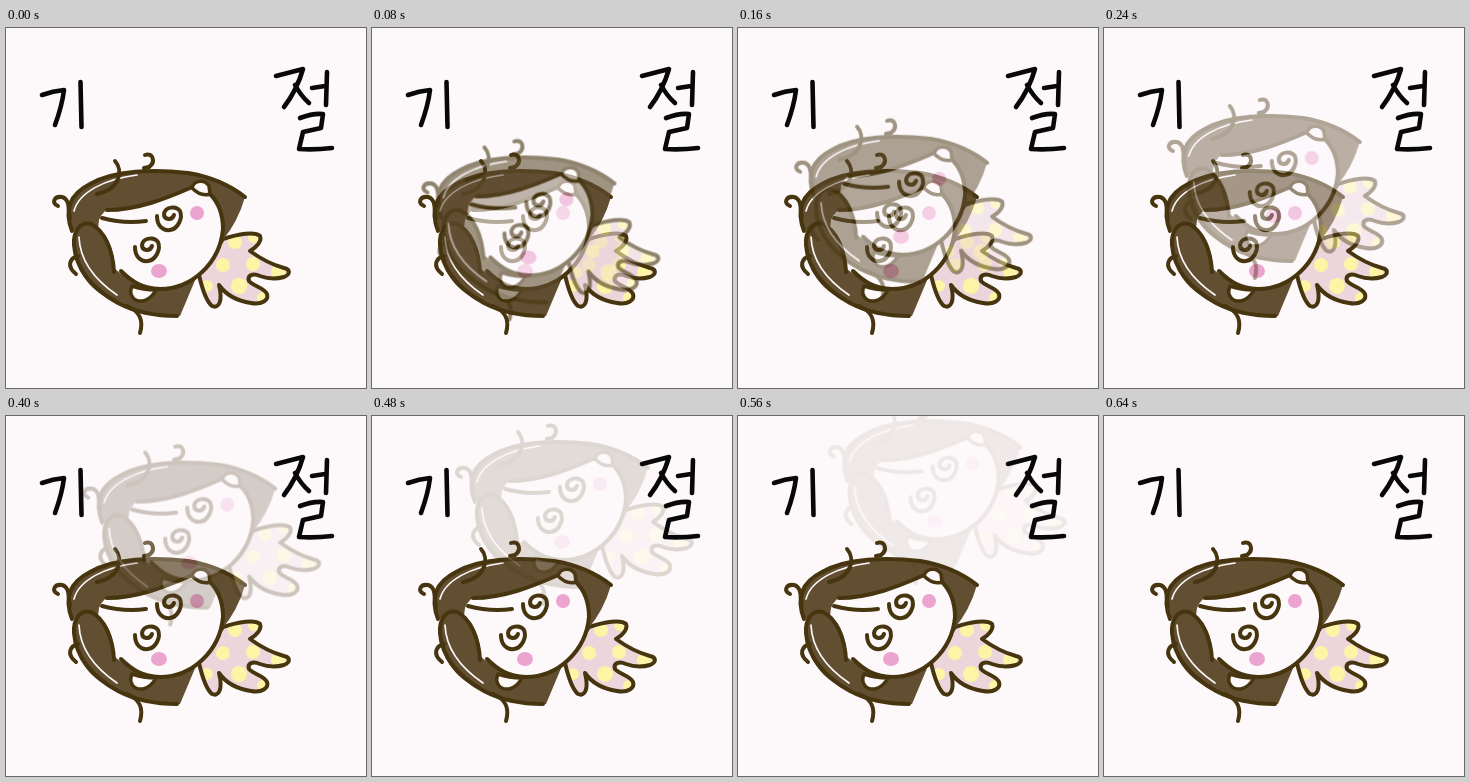
Recreate the animation shown at these times as an HTML page. Size 360x360 px, loop 2160 ms.

```html
<!DOCTYPE html>
<html lang="ko">
<head>
<meta charset="utf-8">
<title>기절</title>
<style>
  html, body { margin: 0; width: 100%; height: 100%; overflow: hidden; background: #fdf9fb; }
  svg { display: block; width: 100%; height: 100%; }
  .line { fill: none; stroke: #46350f; stroke-width: 4; stroke-linecap: round; stroke-linejoin: round; }
  .hair { fill: #624f32; }
  .shine { fill: none; stroke: #fdf9fb; stroke-width: 1.7; stroke-linecap: round; }
  .skin { fill: #fdf9fb; }
  .ear { fill: #fdf9fb; stroke: #46350f; stroke-width: 3.5; stroke-linejoin: round; }
  .cheek { fill: #eba3cf; }
  .dress { fill: #ecd6dc; }
  .dots { fill: #fdf5a5; }
  .ink { fill: none; stroke: #08080b; stroke-width: 4.6; stroke-linecap: round; stroke-linejoin: round; }
</style>
</head>
<body>
<svg viewBox="0 0 360 360">
  <defs>
    <path id="suit" d="M193 247 C196 260 200 273 206 278 C213 281 217 273 213 257 C220 267 232 273 245 275 C256 277 263 272 261 266 C259 260 247 258 243 253 C241 247 247 245 254 248 C262 251 271 251 278 249 C285 246 284 241 278 240 C267 237 255 231 244 223 C251 219 256 213 254 208 C249 203 232 206 217 211 Z"/>
    <clipPath id="suitClip"><use href="#suit"/></clipPath>
    <path id="swirl" d="M-12 -2 C-12 8 -6 13 1 12 C9 11 14 0 11 -7 C7 -13 -4 -11 -5 -4 C-5 2 3 3 5 -3"/>
  </defs>

  <g id="girl">
    <use href="#suit" class="dress"/>
    <g class="dots" clip-path="url(#suitClip)">
      <circle cx="217" cy="237" r="7"/>
      <circle cx="229" cy="214" r="7"/>
      <circle cx="248" cy="209" r="6"/>
      <circle cx="247" cy="236" r="7"/>
      <circle cx="233" cy="258" r="8"/>
      <circle cx="201" cy="258" r="6"/>
      <circle cx="272" cy="244" r="7"/>
      <circle cx="257" cy="270" r="6"/>
    </g>
    <use href="#suit" class="line"/>

    <path class="hair" d="M66 203 C58 182 64 166 84 156 C108 142 148 141 182 145 C206 149 225 158 239 169 Q232 194 216 213 L190 250 L174 288 C140 290 107 278 86 259 C70 242 64 220 70 202 Z"/>
    <path class="skin" d="M93 192 Q97 182 104 181 C132 181 161 170 184 160 C207 162 217 181 217 201 C214 235 186 261 154 261 C136 260 123 252 109 241 C108 222 103 208 92 200 Z"/>

    <path class="line" d="M66 203 C58 182 64 166 84 156 C108 142 148 141 182 145 C206 149 225 158 239 169"/>
    <path class="line" d="M108 244 C107 222 98 202 85 196 C74 193 67 204 68 217 C70 242 87 261 112 275 C131 285 150 288 171 288"/>
    <path class="line" d="M101 182 C132 182 161 170 184 160"/>
    <path class="line" d="M204 166 C214 176 217 188 217 201 C214 235 186 261 154 261 C136 260 126 254 115 243"/>
    <path class="line" d="M96 190 Q118 196 140 193"/>
    <path class="shine" d="M68 183 C73 164 99 151 131 147"/>
    <path class="shine" d="M73 209 C74 234 89 252 111 267"/>

    <path class="ear" d="M186 160 C188 152 199 151 203 158 L204 166 Q195 169 186 160 Z"/>
    <path class="ear" d="M126 258 C122 267 128 274 137 273 Q145 271 150 262 Q137 262 126 258 Z"/>
    <use href="#swirl" class="line" x="163" y="190"/>
    <use href="#swirl" class="line" x="141" y="221"/>
    <circle class="cheek" cx="191" cy="185" r="7"/>
    <ellipse class="cheek" cx="153" cy="243" rx="8" ry="7"/>

    <path class="line" d="M64 190 C62 181 64 171 56 169 C48 168 45 175 52 178"/>
    <path class="line" d="M72 228 C64 230 60 238 70 246"/>
    <path class="line" d="M109 133 C117 142 115 161 91 166"/>
    <path class="line" d="M139 127 C147 124 150 134 143 139 L138 140"/>
    <path class="line" d="M121 278 C133 283 138 291 134 305"/>
  </g>

  <use id="spirit" href="#girl" opacity="0"/>

  <g class="ink" role="img" aria-label="기절">
    <path d="M36 67 Q47 63 58 62 Q56 78 49 97 M74.5 54 L75.5 99"/>
    <path d="M270 48 L297 41 Q291 62 278 79 M289 57 Q295 68 303 75 M306 60 L319 58 M321 44 L320 77"/>
    <path d="M294 90 Q307 85 317 86 L315 100 L297 104 L293 121 Q309 122 326 120"/>
  </g>
</svg>
<script>
  const LOOP = 2160, STEP = 80, COUNT = 7;
  const pose = (time, x, y, opacity) => ({
    offset: time / LOOP,
    transform: `translate(${x}px, ${y}px)`,
    opacity,
    easing: 'steps(1, end)'
  });

  // The spirit drifts up and to the right while it fades.
  const rise = Array.from({ length: COUNT }, (_, i) =>
    pose((i + 1) * STEP, 3.4 + 6.7 * i, -13.6 - 20.7 * i, 0.6 - 0.085 * i));

  document.getElementById('spirit').animate(
    [pose(0, 0, 0, 0), ...rise, pose((COUNT + 1) * STEP, 0, 0, 0), pose(LOOP, 0, 0, 0)],
    { duration: LOOP, iterations: Infinity }
  );
</script>
</body>
</html>
```
